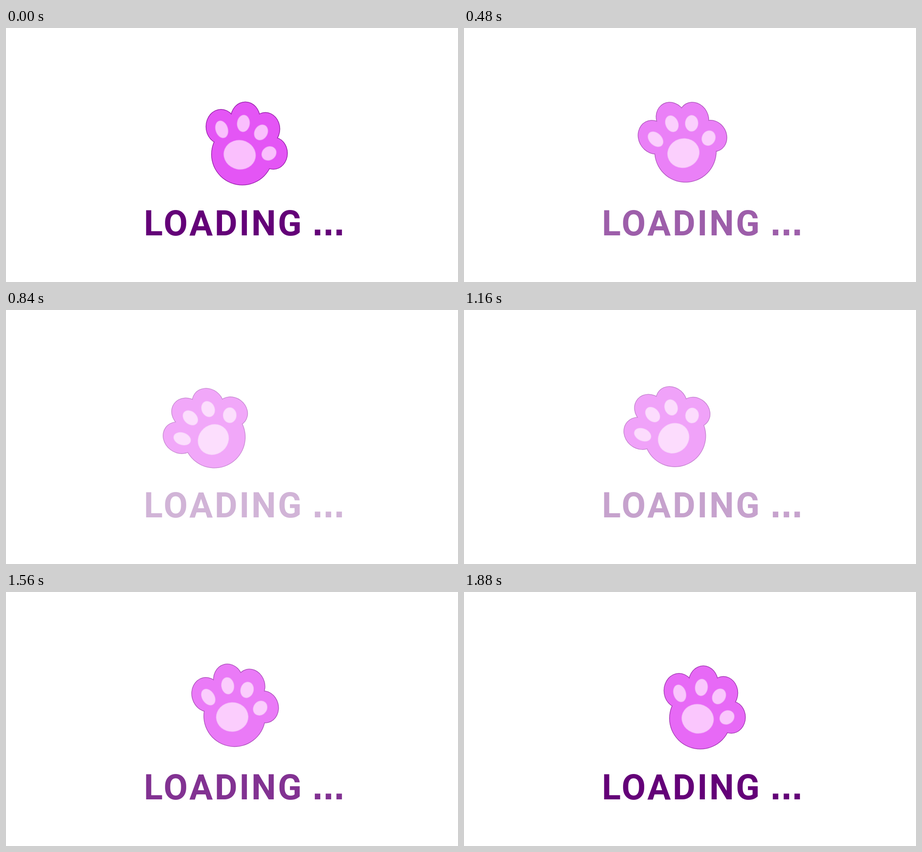
Recreate the animation shown at these times as an HTML page. Size 998 by 561 pixels, loop 1920 ms.

```html
<!DOCTYPE html>
<html lang="en">
<head>
<meta charset="utf-8">
<title>Loading</title>
<style>
  html, body { margin: 0; width: 100%; height: 100%; overflow: hidden; background: #fff; }
  svg { display: block; width: 998px; height: 561px; }
  text { font: 700 77px Roboto, Arial, sans-serif; letter-spacing: 4.2px; fill: #640078; }
  .dots { font: 700 86px 'Liberation Sans', Arial, sans-serif; letter-spacing: 0; }
</style>
</head>
<body>
<svg viewBox="0 0 998 561">
  <g id="paw"></g>
  <text id="label" y="457.5"><tspan x="304.6">LOADING</tspan> <tspan class="dots" x="676">...</tspan></text>
</svg>
<script>
const LOOP = 1920, STEP = 40, HALF = 945;
const SWING = 55, PIVOT = '493 341';
const LINE = '#9a22ad', FUR = '#e455f5', PAD = '#fabffd', PAD_EDGE = '#f1a5f7';
const LEAN = 27, SPREAD = [-69, -21, 21, 69];

const paw = document.getElementById('paw');
const label = document.getElementById('label');

const oval = (cx, cy, rx, ry, tilt = 0) => ({ cx, cy, rx, ry, tilt });

// Four ovals on an arc, shrinking from the first toe to the last.
function fan(x, y, radius, spread, shape) {
  return SPREAD.map((deg, i) => {
    const a = (LEAN + deg * spread) * Math.PI / 180;
    return oval(x + radius * Math.sin(a), y - radius * Math.cos(a), ...shape(i));
  });
}

const body = [
  oval(521.7, 279, 68.7, 68.5),
  ...fan(521.2, 269.4, 69.4, 1, i => [34 - 0.7 * i, 38.9 - 0.9 * i])
];
const pads = [
  oval(516, 280, 35.8, 32.6, 12),
  ...fan(516, 274.9, 64.7, 0.94, i => [13.9 + 0.4 * i, 19.9 - 0.85 * i, 24 * i - 18])
];

function paint(ovals, inset, fill) {
  for (const { cx, cy, rx, ry, tilt } of ovals) {
    const el = document.createElementNS('http://www.w3.org/2000/svg', 'ellipse');
    const attrs = {
      cx, cy, rx: rx - inset, ry: ry - inset, fill,
      transform: `rotate(${tilt} ${cx} ${cy})`
    };
    for (const name in attrs) el.setAttribute(name, attrs[name]);
    paw.append(el);
  }
}

// The fur covers the inner parts of the outlines.
paint(body, 0, LINE);
paint(body, 1.5, FUR);
paint(pads, 0, PAD_EDGE);
paint(pads, 1.2, PAD);

function draw() {
  const t = Math.floor(performance.now() % LOOP / STEP) * STEP;
  const p = (1 - Math.cos(Math.PI * t / HALF)) / 2;
  const fade = t < HALF ? 0.5 * p : 0.12 + 0.38 * p;
  paw.setAttribute('transform', `rotate(${-SWING * p} ${PIVOT})`);
  paw.setAttribute('opacity', 1 - fade);
  label.setAttribute('opacity', 1 - 0.73 * p);
  requestAnimationFrame(draw);
}
draw();
</script>
</body>
</html>
```
